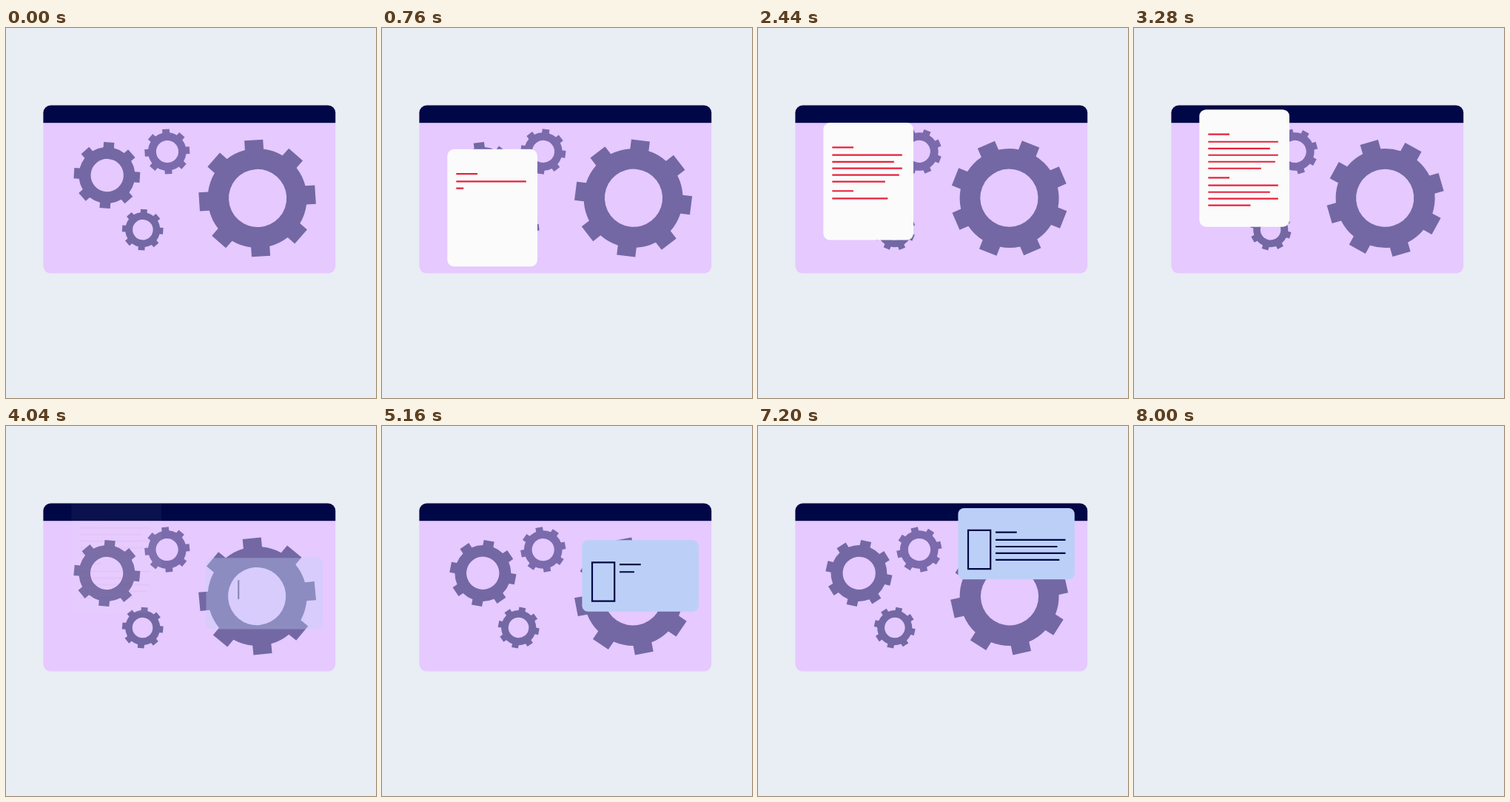
Recreate the animation shown at these times as an HTML page with a canvas. Size 500 px wide and 500 px high, loop 8.04 s.

```html
<!DOCTYPE html>
<html lang="en">
<head>
<meta charset="utf-8">
<title>Turning gears</title>
<style>
  html, body { margin: 0; width: 100%; height: 100%; overflow: hidden; background: #e9edf4; }
  canvas { display: block; }
</style>
</head>
<body>
<canvas id="stage" width="500" height="500"></canvas>
<script>
const ctx = document.getElementById('stage').getContext('2d');
const LOOP = 8040, END = 8000, STEP = 40;
const NAVY = '#000746', LILAC = '#e5c9ff', RED = '#e8213b';
const RISE = 0.0213; // px per ms
const SPIN = 45;     // degrees per second

const gears = [
  { x: 136.4, y: 199, scale: 0.567, dir: 1, color: '#7368a3' },
  { x: 217.8, y: 167, scale: 0.386, dir: -1, color: '#7b6bac' },
  { x: 184.7, y: 272.6, scale: 0.352, dir: 1, color: '#7368a3' },
  { x: 339.6, y: 230, scale: 1, dir: -1, color: '#7368a3' }
];

// Each paragraph: vertical offsets and line widths
const offsets = [0, 10.2, 19.4, 28.2, 37.2, 46.2];
const widths = [28.7, 94.5, 83.5, 94.5, 90.5, 71.5];
const paragraph = top => offsets.map((dy, i) => ({ y: top + dy, w: widths[i] }));

const sheet = {
  x: 88.3, w: 121.7, h: 158.5, r: 9, fill: '#fbfbfb', ink: RED, textX: 100.3,
  start: 0, end: 4050, typeAt: 133, lineTime: 296,
  lines: [...paragraph(33.4), ...paragraph(92.2)]
};
const card = {
  x: 270.4, w: 157.4, h: 96.4, r: 8, fill: '#bcd0f7', ink: NAVY, textX: 321,
  start: 3955, end: 8005, typeAt: 4500, lineTime: 545,
  lines: paragraph(32.7), frame: { x: 284, y: 30, w: 30.2, h: 52.3 }
};

const clamp = v => Math.max(0, Math.min(1, v));

function gearShape() {
  const p = new Path2D();
  const root = 67, tip = 78.6, half = 12.6;
  const base = Math.asin(half / root), reach = Math.hypot(tip, half), edge = Math.atan2(half, tip);
  for (let i = 0; i < 8; i++) {
    const a = i * Math.PI / 4 - Math.PI / 2;
    p.lineTo(reach * Math.cos(a - edge), reach * Math.sin(a - edge));
    p.lineTo(reach * Math.cos(a + edge), reach * Math.sin(a + edge));
    p.arc(0, 0, root, a + base, a + Math.PI / 4 - base);
  }
  p.closePath();
  p.moveTo(39.6, 0);
  p.arc(0.5, 0, 39.1, 0, Math.PI * 2);
  return p;
}
const gearPath = gearShape();

function drawGear(g, t) {
  ctx.save();
  ctx.translate(g.x, g.y);
  ctx.scale(g.scale, g.scale);
  ctx.rotate(g.dir * (3.6 + SPIN * t / 1000) * Math.PI / 180);
  ctx.fillStyle = g.color;
  ctx.fill(gearPath, 'evenodd');
  ctx.restore();
}

function roundBox(x, y, w, h, r) {
  ctx.beginPath();
  ctx.roundRect(x, y, w, h, r);
}

function drawFrame(f, done) {
  const length = 2 * (f.w + f.h);
  ctx.beginPath();
  ctx.moveTo(f.x + f.w, f.y);
  ctx.lineTo(f.x + f.w, f.y + f.h);
  ctx.lineTo(f.x, f.y + f.h);
  ctx.lineTo(f.x, f.y);
  ctx.closePath();
  if (done < 1) ctx.setLineDash([length * done, length]);
  if (done > 0) ctx.stroke();
  ctx.setLineDash([]);
}

function drawNote(n, t) {
  const alpha = Math.min(clamp((t - n.start) / 250), clamp((n.end - t) / 250));
  if (alpha <= 0) return;
  ctx.save();
  ctx.globalAlpha = alpha;
  ctx.translate(0, 180 - RISE * (t - n.start));
  roundBox(n.x, 0, n.w, n.h, n.r);
  ctx.fillStyle = n.fill;
  ctx.fill();
  ctx.strokeStyle = n.ink;
  ctx.lineWidth = 2.2;
  if (n.frame) drawFrame(n.frame, clamp((t - n.start) / n.lineTime));
  n.lines.forEach((line, i) => {
    const done = clamp((t - n.typeAt) / n.lineTime - i);
    if (!done) return;
    ctx.beginPath();
    ctx.moveTo(n.textX, line.y);
    ctx.lineTo(n.textX + line.w * done, line.y);
    ctx.stroke();
  });
  ctx.restore();
}

function draw(t) {
  ctx.fillStyle = '#e9edf4';
  ctx.fillRect(0, 0, 500, 500);
  if (t >= END) return;
  ctx.save();
  roundBox(50.4, 104.6, 394.8, 227, 10);
  ctx.clip();
  ctx.fillStyle = LILAC;
  ctx.fillRect(50, 104, 396, 228);
  ctx.fillStyle = NAVY;
  ctx.fillRect(50, 104, 396, 24.2);
  gears.forEach(g => drawGear(g, t));
  drawNote(sheet, t);
  drawNote(card, t);
  ctx.restore();
}

const began = performance.now();
function tick() {
  const t = (performance.now() - began) % LOOP;
  draw(Math.floor(t / STEP) * STEP);
  requestAnimationFrame(tick);
}
tick();
</script>
</body>
</html>
```
